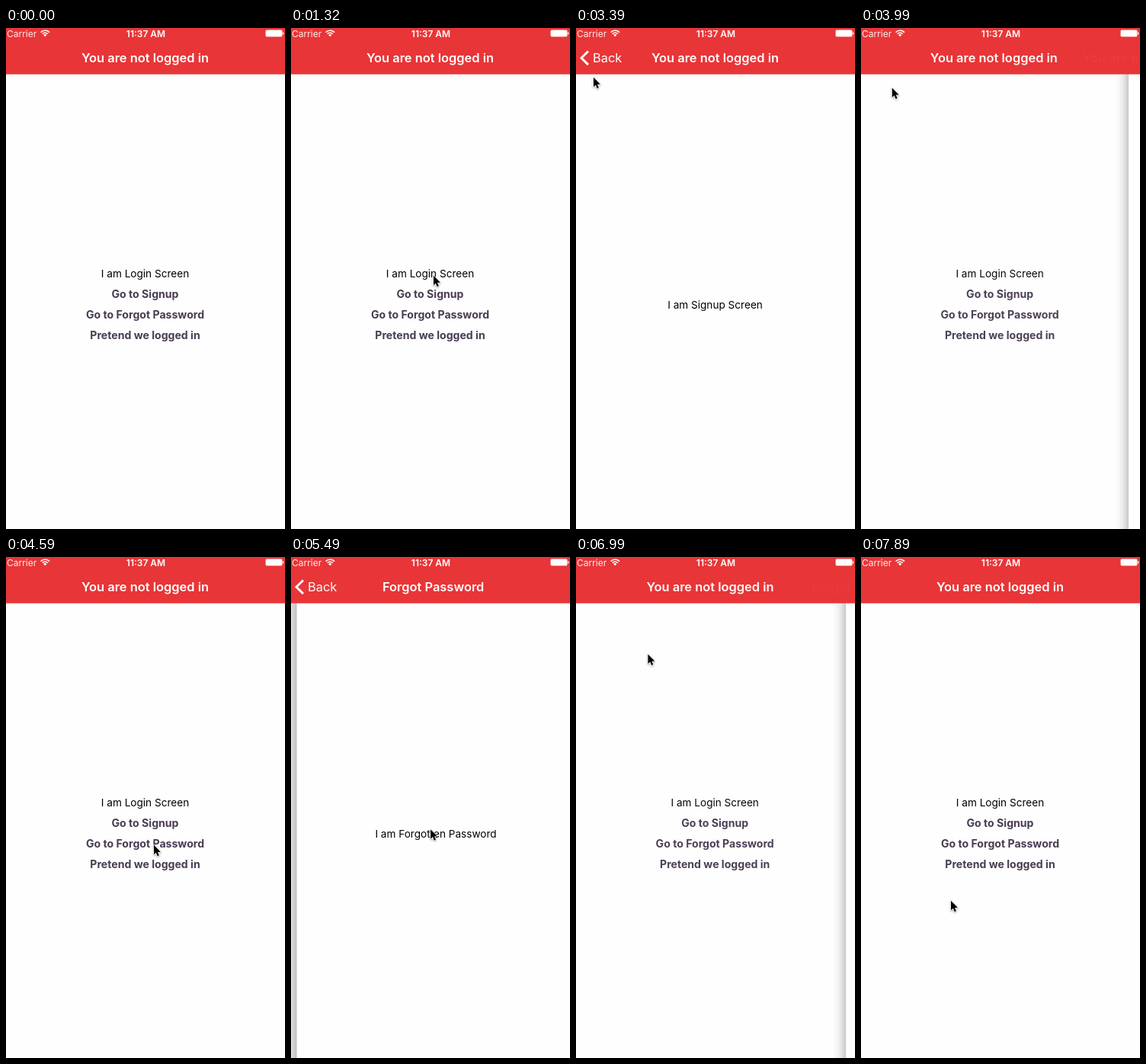
Recreate the animation shown at these times as an HTML page with a canvas. Size 366x657 px, loop 8000 ms.

```html
<!DOCTYPE html>
<html lang="en">
<head>
<meta charset="utf-8">
<title>Login navigation</title>
<style>
  html, body { margin: 0; width: 100%; height: 100%; overflow: hidden; background: #fefefe; }
  canvas { display: block; width: 366px; height: 657px; }
</style>
</head>
<body>
<canvas id="stage"></canvas>
<script>
const W = 366, H = 657, BAR = 60.7, MID = 182.5, LOOP = 8000, SLIDE = 500, STEP = 150;
const FONT = 'Inter, Roboto, "Liberation Sans", sans-serif';
const RED = '#e83537', PAPER = '#fefefe', BACKDROP = '#e9e9ef', LINK = '#483c52';

const canvas = document.getElementById('stage');
const ctx = canvas.getContext('2d');
const dpr = window.devicePixelRatio || 1;
canvas.width = W * dpr;
canvas.height = H * dpr;

// The picture refreshes about every STEP ms inside these spans and rests between them
const spans = [[450, 1320], [1920, 2370], [2660, 3390], [3390, 4590], [5340, 7890]];

const trips = [
  { push: 2560.5, pop: 3735, title: 'You are not logged in', text: 'I am Signup Screen' },
  { push: 5190, pop: 6720, title: 'Forgot Password', text: 'I am Forgotten Password' }
];

// Where the pointer rests; it eases from one stop to the next
const stops = [
  { arrive: 450, leave: 450, x: 15, y: 605 },
  { arrive: 1320, leave: 1770, x: 186, y: 323 },
  { arrive: 2370, leave: 2660, x: 184, y: 346 },
  { arrive: 3390, leave: 3390, x: 22, y: 63 },
  { arrive: 3690, leave: 3840, x: 22, y: 42 },
  { arrive: 4590, leave: 5340, x: 193, y: 376 },
  { arrive: 6240, leave: 6240, x: 46, y: 98 },
  { arrive: 6540, leave: 6840, x: 25, y: 42 },
  { arrive: 7290, leave: 7290, x: 289, y: 365 },
  { arrive: 7890, leave: LOOP, x: 117, y: 449 }
];

const clamp = v => Math.min(1, Math.max(0, v));
const smooth = v => v * v * (3 - 2 * v);
const mix = (a, b, k) => a + (b - a) * k;

function stepped(t) {
  const span = spans.filter(([from]) => from <= t).pop();
  if (!span) return 0;
  const [from, to] = span;
  const count = Math.round((to - from) / STEP);
  return mix(from, to, Math.floor(clamp((t - from) / (to - from)) * count + 1e-6) / count);
}

// Cubic bezier (0.2833, 0.99, 0.31833, 0.99)
function ease(x) {
  x = clamp(x);
  if (x === 0 || x === 1) return x;
  const curve = (s, a, b) => 3 * (1 - s) ** 2 * s * a + 3 * (1 - s) * s * s * b + s ** 3;
  let lo = 0, hi = 1;
  for (let i = 0; i < 24; i++) {
    const mid = (lo + hi) / 2;
    if (curve(mid, 0.2833, 0.31833) < x) lo = mid; else hi = mid;
  }
  return curve(lo, 0.99, 0.99);
}

function progress({ push, pop }, t) {
  return t < pop ? ease((t - push) / SLIDE) : 1 - ease((t - pop) / SLIDE);
}

function pointerAt(t) {
  const i = stops.findLastIndex(s => s.arrive <= t);
  if (i < 0) return null;
  const a = stops[i], b = stops[i + 1] || a;
  const k = a === b ? 0 : smooth(clamp((t - a.leave) / (b.arrive - a.leave)));
  return { x: mix(a.x, b.x, k), y: mix(a.y, b.y, k) };
}

function label(str, x, y, size, weight, color, align = 'center', alpha = 1) {
  ctx.save();
  ctx.globalAlpha = alpha;
  ctx.font = `${weight} ${size}px ${FONT}`;
  ctx.textAlign = align;
  ctx.fillStyle = color;
  ctx.fillText(str, x, y);
  ctx.restore();
}

const bodyText = (str, x, y) => label(str, x, y, 13.6, 400, '#000');
const titleText = (str, x, alpha) => label(str, x, 45.2, 16.45, 600, '#fff', 'center', alpha);

function loginCard(p) {
  const x = MID - 10 * p;
  ctx.fillStyle = PAPER;
  ctx.fillRect(0, 0, W, H);
  bodyText('I am Login Screen', x, 327);
  ['Go to Signup', 'Go to Forgot Password', 'Pretend we logged in'].forEach((s, i) =>
    label(s, x, 354 + 27 * i, 14.1, 700, LINK));
  ctx.globalAlpha = 0.7 * p;
  ctx.fillStyle = BACKDROP;
  ctx.fillRect(0, 0, W, H);
  ctx.globalAlpha = 1;
}

function topCard(p, text) {
  const x = W * (1 - p);
  ctx.save();
  ctx.shadowColor = 'rgba(0,0,0,0.45)';
  ctx.shadowBlur = 17 * dpr;
  ctx.fillStyle = PAPER;
  ctx.fillRect(x, -30, W, H + 60);
  ctx.restore();
  bodyText(text, x + MID, 367.5);
}

function wifi(x, y) {
  const up = -Math.PI / 2, half = 0.8;
  ctx.lineWidth = 1.6;
  for (const r of [5, 8]) {
    ctx.beginPath();
    ctx.arc(x, y, r, up - half, up + half);
    ctx.stroke();
  }
  ctx.beginPath();
  ctx.moveTo(x, y);
  ctx.arc(x, y, 3, up - half, up + half);
  ctx.fill();
}

function battery(x, y) {
  ctx.globalAlpha = 0.45;
  ctx.lineWidth = 1;
  ctx.beginPath();
  ctx.roundRect(x + 0.5, y + 0.5, 22, 9, 2);
  ctx.stroke();
  ctx.globalAlpha = 1;
  ctx.beginPath();
  ctx.roundRect(x + 1, y + 1, 21, 8, 1);
  ctx.roundRect(x + 23, y + 3.5, 1.3, 3, 0.6);
  ctx.fill();
}

function statusBar() {
  label('Carrier', 1, 11.5, 12, 400, 'rgba(255,255,255,0.9)', 'left');
  label('11:37 AM', 183.5, 11.5, 12, 600, '#fff');
  ctx.strokeStyle = ctx.fillStyle = '#fff';
  wifi(51.3, 11.3);
  battery(340, 2);
}

function backButton(alpha) {
  if (alpha <= 0) return;
  ctx.save();
  ctx.globalAlpha = alpha;
  ctx.strokeStyle = '#fff';
  ctx.lineWidth = 2.9;
  ctx.beginPath();
  ctx.moveTo(16, 30.5);
  ctx.lineTo(7, 39.3);
  ctx.lineTo(16, 48.1);
  ctx.stroke();
  ctx.restore();
  label('Back', 22, 45.3, 16.4, 400, '#fff', 'left', alpha);
}

function header(p, title) {
  ctx.fillStyle = RED;
  ctx.fillRect(0, 0, W, BAR);
  backButton(clamp(2 * p - 1));
  titleText('You are not logged in', MID - 200 * p, 1 - p);
  titleText(title, MID + 200 * (1 - p), p);
  statusBar();
}

function pointer({ x, y }) {
  const arrow = new Path2D('M0 0V14.6L3.3 11.5L5.6 16.8L8 15.7L5.8 10.6L10.3 10.4Z');
  ctx.save();
  ctx.translate(x + 1, y + 1.8);
  ctx.scale(0.86, 0.86);
  ctx.lineJoin = 'round';
  ctx.lineWidth = 1.6;
  ctx.strokeStyle = '#fff';
  ctx.shadowColor = 'rgba(0,0,0,0.4)';
  ctx.shadowBlur = 2.5 * dpr;
  ctx.shadowOffsetY = dpr;
  ctx.stroke(arrow);
  ctx.shadowColor = 'transparent';
  ctx.fillStyle = '#000';
  ctx.fill(arrow);
  ctx.restore();
}

function draw(now) {
  const t = stepped(now % LOOP);
  const trip = trips[t < 4700 ? 0 : 1];
  const p = progress(trip, t);
  ctx.setTransform(dpr, 0, 0, dpr, 0, 0);
  loginCard(p);
  if (p > 0) topCard(p, trip.text);
  header(p, trip.title);
  const at = pointerAt(t);
  if (at) pointer(at);
}

let start;
function tick(now) {
  if (start === undefined) start = now;
  draw(Math.max(0, now - start));
  requestAnimationFrame(tick);
}
requestAnimationFrame(tick);
</script>
</body>
</html>
```
